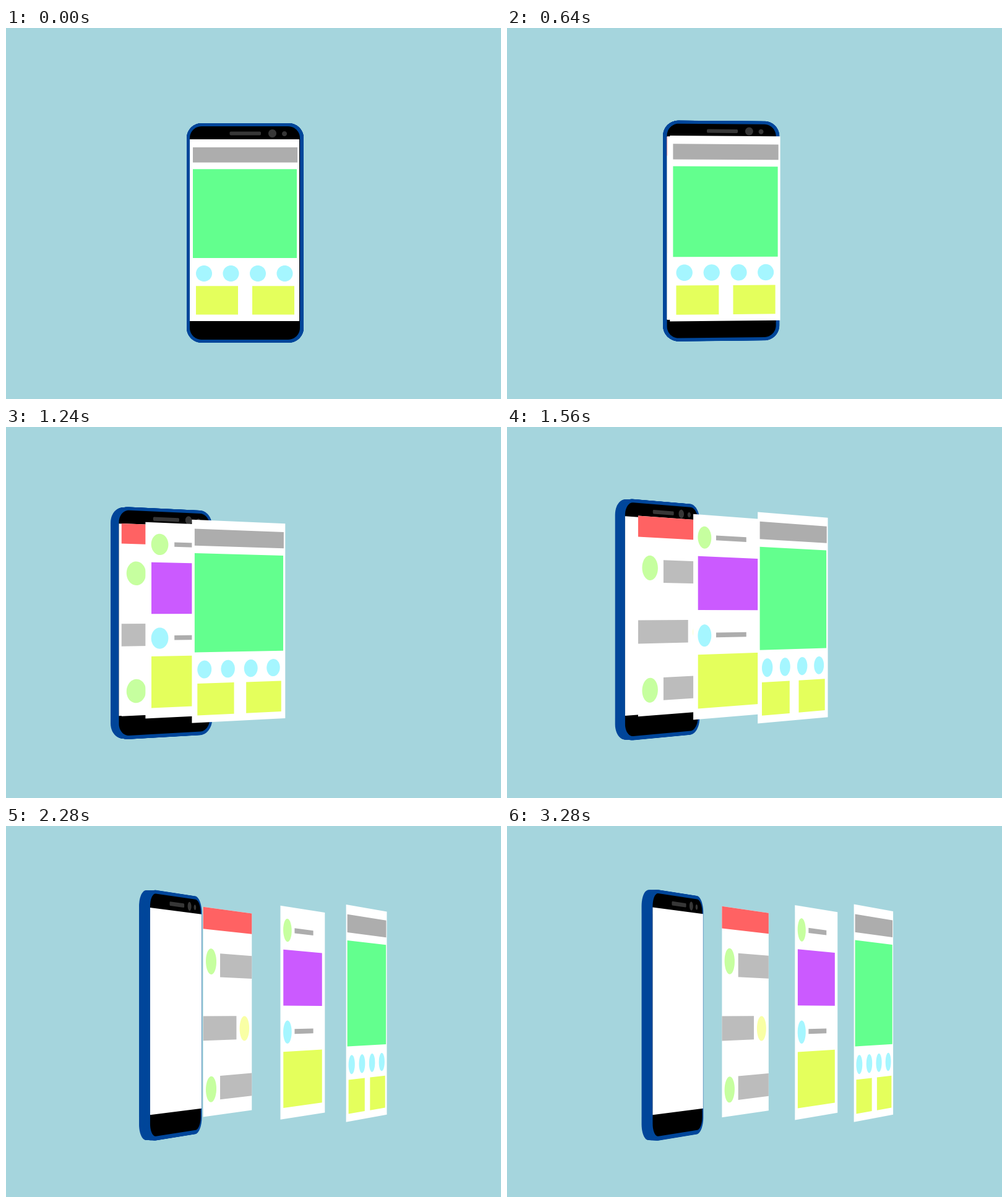
An HTML page with a canvas that plays this animation: 800x600 px, repeating every 3320 ms.

```html
<!DOCTYPE html>
<html lang="en">
<head>
<meta charset="utf-8">
<title>Phone screens in layers</title>
<style>
  html, body { margin: 0; width: 100%; height: 100%; overflow: hidden; background: #a5d5dd; }
  canvas { display: block; width: 800px; height: 600px; }
</style>
</head>
<body>
<canvas id="stage" width="800" height="600"></canvas>
<script>
const ctx = document.getElementById('stage').getContext('2d');
const LOOP = 3320, STEP = 40;
const W = 177, H = 294;   // flat size of one screen
const CAMERA = 2750;      // viewing distance
const TURN = 68 * Math.PI / 180;
const THICK = 15;

const color = {
  sky: '#a5d5dd', body: '#00469a', black: '#000', lens: '#373737', white: '#fff',
  bar: '#adadad', chat: '#bcbcbc', green: '#63ff8e', aqua: '#a5f6ff', lemon: '#e4ff5c',
  purple: '#cb5aff', red: '#ff6263', lime: '#c6ff9f', cream: '#f9ffa5'
};

// Each layer lifts off the phone to its own height, one after the other.
const layers = [
  { paint: paintChat, lift: 107, delay: 785 },
  { paint: paintFeed, lift: 215, delay: 350 },
  { paint: paintHome, lift: 300, delay: 0 }
];

// Same curve as CSS cubic-bezier(x1, 0, x2, 1)
function ease(p, x1, x2) {
  if (p <= 0) return 0;
  if (p >= 1) return 1;
  let lo = 0, hi = 1, s;
  for (let i = 0; i < 24; i++) {
    s = (lo + hi) / 2;
    const x = 3 * x1 * s * (1 - s) ** 2 + 3 * x2 * s * s * (1 - s) + s ** 3;
    if (x < p) lo = s; else hi = s;
  }
  return s * s * (3 - 2 * s);
}

// The phone swings around a drifting pivot. Returns a map from screen
// coordinates and height above the screen to the stage.
function orbit(turn) {
  const cos = Math.cos(TURN * turn), sin = Math.sin(TURN * turn);
  const pivotX = 114.5 + 293 * turn, pivotZ = 507 - 176.5 * turn;
  const rise = 27 - 27.5 * turn;
  return (x, y, height) => {
    const a = x - W / 2 - 129, b = height - 507;
    const k = CAMERA / (CAMERA - pivotZ + a * sin - b * cos);
    return [
      400 + k * (pivotX + a * cos + b * sin),
      300 + k * (rise + y - H / 2 + 0.009 * height)
    ];
  };
}

function box(at, fill, x0, y0, x1, y1, r = 0) {
  const corners = [[x1 - r, y0 + r], [x1 - r, y1 - r], [x0 + r, y1 - r], [x0 + r, y0 + r]];
  const steps = r ? 12 : 0;
  ctx.beginPath();
  corners.forEach(([cx, cy], n) => {
    for (let k = 0; k <= steps; k++) {
      const a = (n - 1 + (steps ? k / steps : 0)) * Math.PI / 2;
      ctx.lineTo(...at(cx + r * Math.cos(a), cy + r * Math.sin(a)));
    }
  });
  ctx.closePath();
  ctx.fillStyle = fill;
  ctx.fill();
}

function dot(at, fill, x, y, r) {
  box(at, fill, x - r, y - r, x + r, y + r, r);
}

function sheet(at) {
  box(at, color.white, 0, 0, W, H);
}

// The far rim turns out of sight as the phone swings.
function paintPhone(plane, turn) {
  for (let h = -THICK; h <= 0; h++) {
    box(plane(h), color.body, -5, -26, 184 - 6 * turn, 329 + 2.5 * turn, 24);
  }
  const face = plane(0);
  box(face, color.black, 0, -21, 178 - 4 * turn, 324 + 1.5 * turn, 19);
  box(face, color.lens, 64.5, -12.5, 115, -6.5, 2);
  dot(face, color.lens, 133.5, -9.5, 6.5);
  dot(face, color.lens, 153, -9, 4);
  sheet(face);
}

function paintChat(at) {
  box(at, color.red, 0, 0, W, 30.7);
  for (const y of [80.5, 255.5]) {
    dot(at, color.lime, 27.5, y === 80.5 ? 75.8 : 256.5, 18.3);
    box(at, color.chat, 59, y - 17, W, y + 17);
  }
  box(at, color.chat, 0, 153, 118.5, 187.4);
  dot(at, color.cream, 148.7, 171.6, 18.3);
}

function paintFeed(at) {
  const rows = [[color.lime, color.purple, 32.7], [color.aqua, color.lemon, 174]];
  for (const [head, card, y] of rows) {
    dot(at, head, 26.6, y, 16);
    box(at, color.bar, 54, y - 4, 128.5, y + 3);
    box(at, card, 11, y + 27.2, 165, y + 104.6);
  }
}

function paintHome(at) {
  box(at, color.bar, 5, 13, 174, 37.5);
  box(at, color.green, 5, 48.3, 173, 192);
  for (let i = 0; i < 4; i++) dot(at, color.aqua, 23 + 43.5 * i, 217, 13);
  for (const x of [10, 101]) box(at, color.lemon, x, 237.3, x + 68, 283.5);
}

function draw(t) {
  ctx.fillStyle = color.sky;
  ctx.fillRect(0, 0, 800, 600);
  const turn = ease(t / 2500, 0.48, 0.41);
  const map = orbit(turn);
  const plane = height => (x, y) => map(x, y, height);
  paintPhone(plane, turn);
  for (const { paint, lift, delay } of layers) {
    const at = plane(lift * ease((t - delay) / 2700, 0.435, 0.315));
    sheet(at);
    paint(at);
  }
}

const start = performance.now();
function tick() {
  const t = (performance.now() - start) % LOOP;
  draw(Math.floor(t / STEP) * STEP);
  requestAnimationFrame(tick);
}
tick();
</script>
</body>
</html>
```
